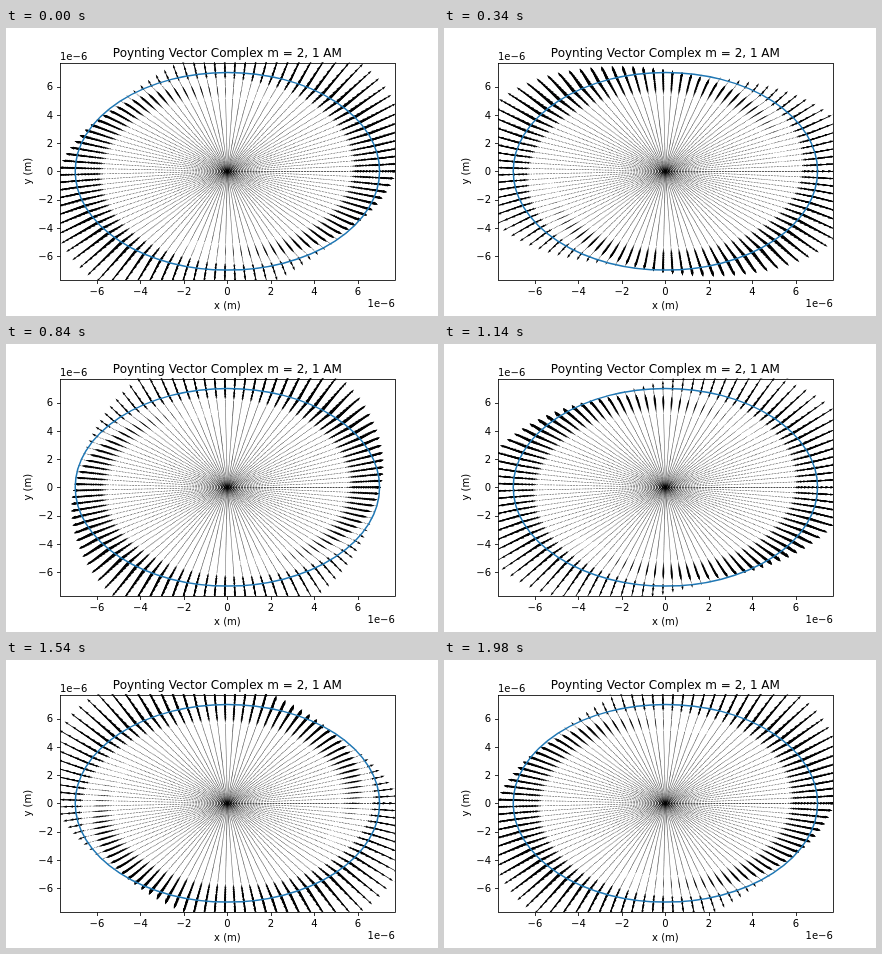
Write an HTML page with a canvas that moves like this. It is 432 px wide and 288 px high and loops after 2 s.

```html
<!DOCTYPE html>
<html>
<head>
<meta charset="utf-8">
<style>
html, body { margin: 0; width: 432px; height: 288px; overflow: hidden; background: #fff; }
canvas, svg { position: absolute; left: 0; top: 0; }
text { font: 10px "DejaVu Sans", sans-serif; text-anchor: middle; }
.end { text-anchor: end; }
.axis { fill: none; stroke: #000; stroke-width: .8; }
</style>
</head>
<body>
<canvas id="field" width="432" height="288"></canvas>
<svg width="432" height="288">
  <ellipse cx="221.4" cy="143.28" rx="152.18" ry="98.84" fill="none" stroke="#1f77b4" stroke-width="1.5"/>
  <rect class="axis" x="54.5" y="35.5" width="335" height="217"/>
  <g id="ticks"></g>
  <text x="221.4" y="28.6" style="font-size:12px">Poynting Vector Complex m = 2, 1 AM</text>
  <text x="221.4" y="280.5">x (m)</text>
  <text transform="translate(25.3 143.3) rotate(-90)">y (m)</text>
  <text x="54" y="31.5" style="text-anchor:start">1e−6</text>
  <text class="end" x="388.8" y="278.5">1e−6</text>
</svg>
<script>
const CX = 221.4, CY = 143.28, SX = 21.74, SY = 14.12;
const N = 100, R = 7, UNIT = 0.8;      // UNIT: arrow shaft width in px
const PEAK = 48, POWER = 13, K = 1.3, START = 0.66;
const STEP = 20, STEPS = N - 1;
const INNER = 71;                      // radii below this only ever hold dots

let marks = '';
for (let v = -6; v <= 6; v += 2) {
  const label = String(v).replace('-', '−');
  const x = CX + v * SX, y = CY - v * SY;
  const px = Math.round(x) + 0.5, py = Math.round(y) + 0.5;
  marks += `<path class="axis" d="M${px} 252.5v3.5M54.5 ${py}h-3.5"/>
    <text x="${x}" y="267">${label}</text>
    <text class="end" x="47" y="${y + 3.8}">${label}</text>`;
}
document.getElementById('ticks').innerHTML = marks;

const ctx = document.getElementById('field').getContext('2d');
ctx.beginPath();
ctx.rect(54, 34.56, 334.8, 217.44);
ctx.clip();

const hexagon = [0, 1, 2, 3, 4, 5].map(i => [Math.cos(i * Math.PI / 3) / 2, Math.sin(i * Math.PI / 3) / 2]);

function arrow(len) {
  if (len < 1) return hexagon;
  const s = Math.min(1, len / 5), l = Math.max(5, len);
  const half = [[0, 0.5], [l - 4.5, 0.5], [l - 5, 1.5]].map(([x, y]) => [x * s, y * s]);
  return [...half, [len, 0], ...half.reverse().map(([x, y]) => [x, -y])];
}

function drawShape(g, points, r, angle) {
  const c = Math.cos(angle), s = Math.sin(angle);
  const x0 = CX + r * c * SX, y0 = CY - r * s * SY;
  g.beginPath();
  for (const [x, y] of points) {
    g.lineTo(x0 + (x * c - y * s) * UNIT, y0 - (x * s + y * c) * UNIT);
  }
  g.fill();
}

function drawRings(g, from, to, length) {
  for (let j = 0; j < N; j++) {
    const angle = 2 * Math.PI * j / (N - 1);
    for (let i = from; i < to; i++) {
      const r = R * i / (N - 1);
      drawShape(g, arrow(length(r, angle) / UNIT), r, angle);
    }
  }
}

const dots = document.createElement('canvas');
dots.width = 432;
dots.height = 288;
drawRings(dots.getContext('2d'), 0, INNER, () => 0);

function drawField(step) {
  const phase = START + 2 * Math.PI * step / STEPS;
  ctx.clearRect(0, 0, 432, 288);
  ctx.drawImage(dots, 0, 0);
  // outward spiral wave, growing steeply with the radius
  drawRings(ctx, INNER, N, (r, angle) =>
    PEAK * (r / R) ** POWER * Math.sin(angle + phase + K * (R - r)) ** 2);
}

let shown = -1;
function tick() {
  const step = Math.floor(performance.now() / STEP) % N;
  if (step !== shown) drawField(shown = step);
  requestAnimationFrame(tick);
}
tick();
</script>
</body>
</html>
```
